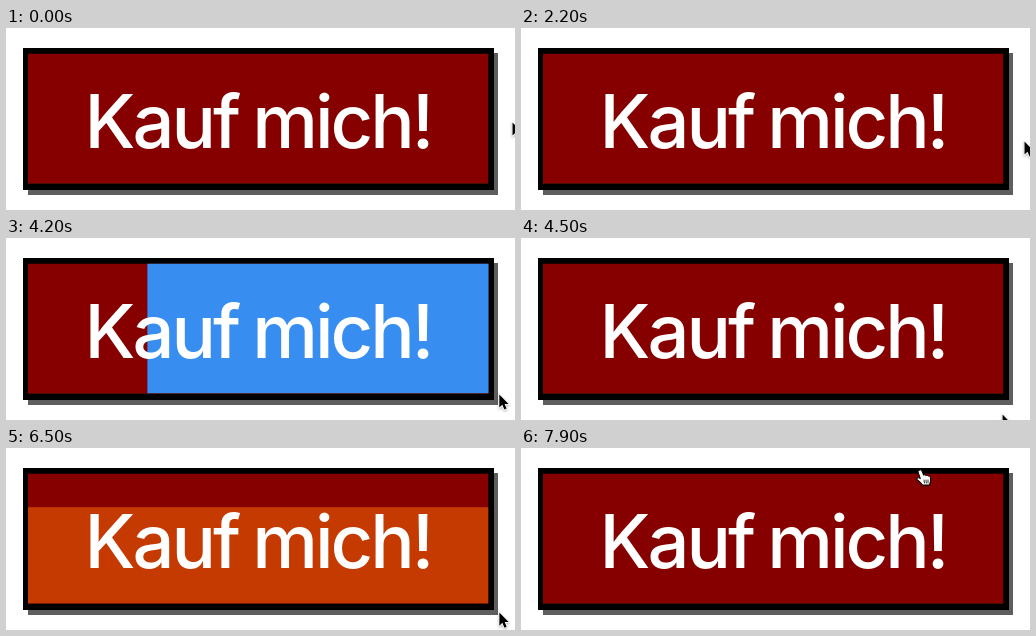
Animation of 509 by 182 pixels, one loop 8 s. Source, as an HTML page:

```html
<!DOCTYPE html>
<html lang="de">
<head>
<meta charset="utf-8">
<title>Kauf mich!</title>
<style>
  html, body { margin: 0; width: 100%; height: 100%; overflow: hidden; background: #fff; }
  svg { display: block; width: 509px; height: 182px; }
  text {
    font: 460 74px Inter, "Liberation Sans", sans-serif;
    font-optical-sizing: none;
    letter-spacing: -3px;
    word-spacing: -2.5px;
    fill: #fff;
  }
  #cursor { filter: drop-shadow(0 1px 1px rgba(0, 0, 0, .3)); }
</style>
</head>
<body>
<svg viewBox="0 0 509 182">
  <clipPath id="inside"><rect id="face" x="22" y="25.5" width="460.5" height="130"/></clipPath>
  <rect x="22" y="25" width="470" height="142" fill="#5e5e5e"/>
  <rect x="17" y="20" width="471" height="142"/>
  <g clip-path="url(#inside)">
    <use href="#face" fill="#870000"/>
    <use id="blue" href="#face" fill="#388ef0"/>
    <use id="orange" href="#face" fill="#c53a00"/>
  </g>
  <text x="78.5" y="120">Kauf mich!</text>
  <g id="cursor">
    <path id="arrow" d="M.5 .5V13.6L3.5 10.8L5.6 15.6L7.8 14.6L5.8 10H9.8Z"
          stroke="#fff" stroke-width="1.6" paint-order="stroke"/>
    <g id="hand" transform="translate(-4 -1)" stroke="#000" stroke-linejoin="round" stroke-linecap="round">
      <path fill="#fff" d="M3.2 1Q5 .2 6 2L7.6 6.2Q9 5 9.8 6.5Q11.2 5.4 12.2 7Q14 6.4 14.4 8.6Q15 12 13.5 16H6.5Q5 13 1 10.5Q0 8 3 8.8L4.4 9.6L2 3Q1.7 1.4 3.2 1Z"/>
      <path fill="none" stroke-width=".8" d="M8 11L8.5 14M10 11L10.3 14M12 11V14"/>
    </g>
  </g>
</svg>
<script>
  const LOOP = 8000, STEP = 100, SLIDE = 300;
  const el = id => document.getElementById(id);
  const clamp = k => Math.min(1, Math.max(0, k));

  // Each pointer move is one curve: start point, control point, end point
  const moves = [
    { start: 100, end: 800, path: [[506, 94], [502, 97], [505, 100]] },
    { start: 900, end: 1500, path: [[505, 100], [506, 107], [503, 113]] },
    { start: 2700, end: 3100, path: [[503, 113], [478, 115], [469, 114]] },
    { start: 3800, end: 4800, path: [[469, 114], [518, 157], [467, 186]] },
    { start: 5000, end: 5800, path: [[467, 186], [460, 147], [453, 137]] },
    { start: 6100, end: 7000, path: [[453, 137], [492, 185], [514, 148]] },
    { start: 7000, end: 7900, path: [[512, 78], [490, -42], [399, 22]] }
  ];

  function pointer(t) {
    const { start, end, path: [a, b, c] } = moves.findLast(m => m.start <= t) || moves[0];
    const v = (1 - clamp((t - start) / (end - start))) ** 1.5;
    const u = 1 - v;
    return [0, 1].map(i => v * v * a[i] + 2 * u * v * b[i] + u * u * c[i]);
  }

  function ease(t, start) {
    const k = clamp((t - start) / SLIDE);
    return k * k * (3 - 2 * k);
  }

  // Uncovered share of the face for a fill that enters and later retreats
  const gap = (t, enter, leave) => 1 - ease(t, enter) + ease(t, leave);

  function draw(now) {
    const t = Math.floor(now % LOOP / STEP) * STEP;
    const [x, y] = pointer(t);
    const over = x >= 17 && x < 488 && y >= 20 && y < 162;
    el("cursor").setAttribute("transform", `translate(${x} ${y})`);
    el("hand").setAttribute("visibility", over ? "visible" : "hidden");
    el("arrow").setAttribute("visibility", over ? "hidden" : "visible");
    el("blue").setAttribute("x", 460.5 * gap(t, 2790, 4100));
    el("orange").setAttribute("y", 130 * gap(t, 5200, 6400));
  }

  const start = performance.now();
  function tick() {
    draw(performance.now() - start);
    requestAnimationFrame(tick);
  }
  tick();
</script>
</body>
</html>
```
